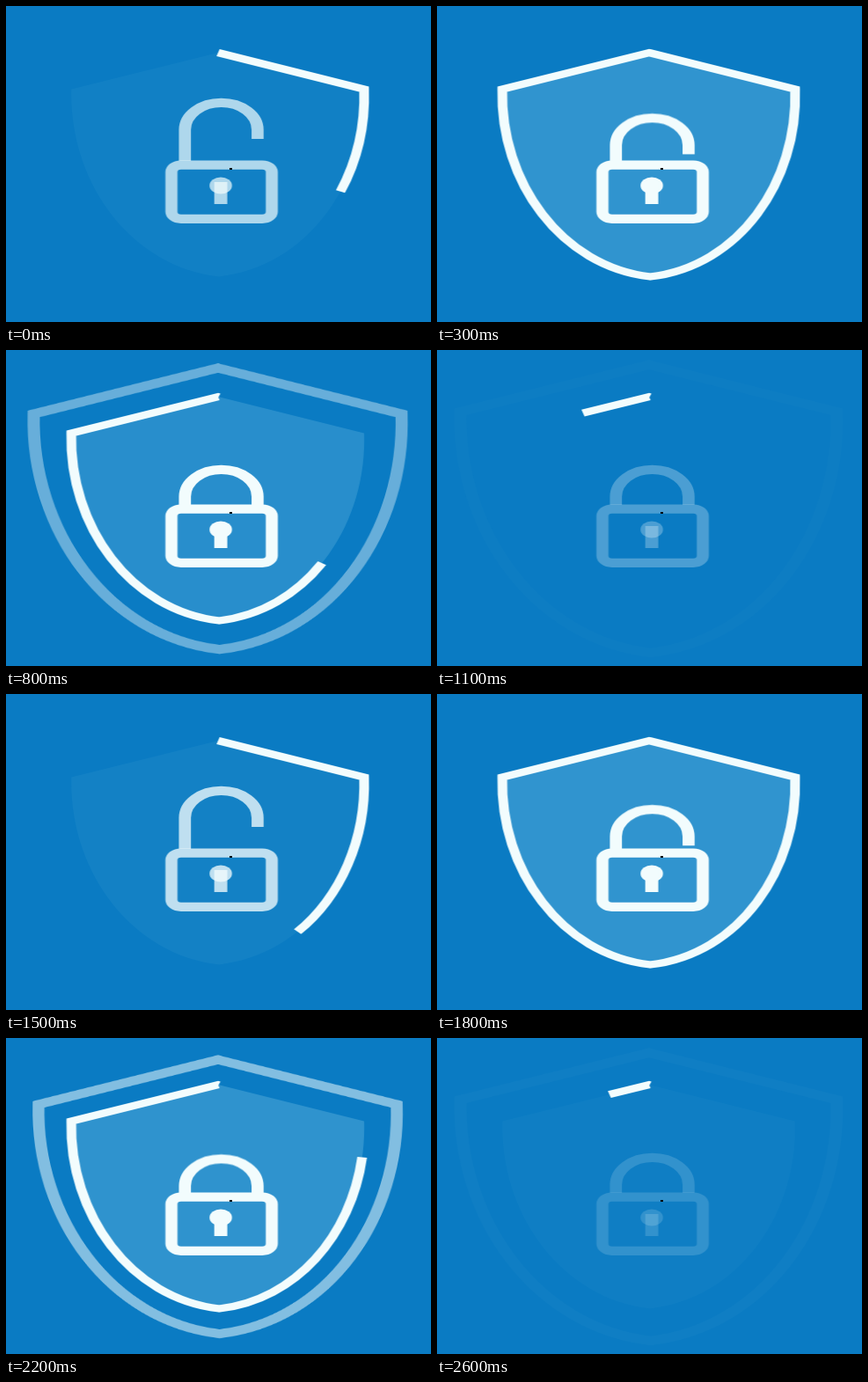
Write an HTML page without scripts that moves like this. It is 483 by 359 pixels and loops after 2700 ms.

```html
<!DOCTYPE html>
<html lang="en">
<head>
<meta charset="utf-8">
<title>Shield lock</title>
<style>
  html, body { margin: 0; width: 100%; height: 100%; overflow: hidden; background: #0a7bc3; }
  svg { display: block; width: 100vw; height: 100vh; }

  .line { fill: none; stroke: #f2fcfd; }
  .solid { fill: #f2fcfd; }
  .outline, .ring { stroke-width: 8.2; }
  .lock { stroke-width: 10.2; }

  .outline, .tint, .ring, .lock, .shackle {
    animation: 2.7s linear infinite;
  }
  .outline { stroke-dasharray: 1000 1000; animation-name: trace; }
  .tint { fill: #c8f8ff; animation-name: tint; }
  .ring { animation-name: grow, dissolve; }
  .lock { animation-name: appear; }
  .shackle { animation-name: close; }

  /* The stroke draws clockwise, then erases clockwise, twice per loop. */
  @keyframes trace {
    0% { stroke-dashoffset: 690; animation-timing-function: cubic-bezier(.3, .43, .6, 1); }
    11.44% { stroke-dashoffset: 0; }
    17.9% { stroke-dashoffset: 0; animation-timing-function: ease-in-out; }
    46.2% { stroke-dashoffset: -1000; animation-timing-function: step-end; }
    47.4% { stroke-dashoffset: 1000; animation-timing-function: ease-in-out; }
    65.93% { stroke-dashoffset: 0; }
    72.3% { stroke-dashoffset: 0; animation-timing-function: cubic-bezier(.42, 0, .64, 1); }
    100% { stroke-dashoffset: -1000; }
  }
  @keyframes tint {
    0% { opacity: .04; }
    9.2%, 26.7% { opacity: .2; }
    40.7%, 53% { opacity: 0; }
    63.7%, 81.5% { opacity: .2; }
    95.5%, 100% { opacity: .03; }
  }
  @keyframes grow {
    0% { transform: scale(1); }
    12.41% { transform: scale(1); animation-timing-function: ease; }
    40.19% { transform: scale(1.285); animation-timing-function: step-end; }
    48% { transform: scale(1); }
    68.15% { transform: scale(1); animation-timing-function: ease; }
    95.93%, 100% { transform: scale(1.285); }
  }
  @keyframes dissolve {
    0% { opacity: 0; animation-timing-function: step-end; }
    12.41% { opacity: 1; }
    41.3% { opacity: 0; animation-timing-function: step-end; }
    68.15% { opacity: 1; }
    95.5%, 100% { opacity: .025; }
  }
  @keyframes appear {
    0% { opacity: .7; }
    3%, 35.19% { opacity: 1; }
    42.96%, 48.15% { opacity: 0; }
    57.78%, 89.63% { opacity: 1; }
    97.6%, 100% { opacity: 0; }
  }
  /* The shackle presses slightly past its seat, then settles. */
  @keyframes close {
    0% { transform: translateY(-26px); }
    4.07% { transform: translateY(-26px); animation-timing-function: ease-in-out; }
    16.3%, 27% { transform: translateY(1.5px); }
    29.6% { transform: none; animation-timing-function: step-end; }
    45% { transform: translateY(-26px); }
    58.52% { transform: translateY(-26px); animation-timing-function: ease-in-out; }
    70.74%, 81.5% { transform: translateY(1.5px); }
    84.1%, 100% { transform: none; }
  }
</style>
</head>
<body>
<svg viewBox="0 0 483 359" preserveAspectRatio="none">
  <defs>
    <!-- The short overrun past the apex mitres the seam. -->
    <path id="shield" pathLength="1000" d="M0-127 123.4-85.5C126 20 76 116 1 127.5C-74 116-126 20-124-85.5L0-127 .5-126.8"/>
    <clipPath id="aboveBody"><rect x="-60" y="-90" width="130" height="85.5"/></clipPath>
  </defs>
  <g transform="translate(241 180) scale(1.345 1)">
    <use href="#shield" class="tint"/>
    <use href="#shield" class="line ring"/>
    <use href="#shield" class="line outline"/>
    <g class="lock" clip-path="url(#aboveBody)">
      <path class="line shackle" d="M-28 40V-13.5a30.7 30.7 0 0 1 61.4 0V-3"/>
    </g>
    <rect class="line lock" x="-39.4" y=".6" width="84.8" height="61.2" rx="8"/>
    <circle class="solid lock" cx="2.3" cy="24" r="9.5"/>
    <rect class="solid lock" x="-3.2" y="20" width="11" height="25"/>
  </g>
  <rect x="254" y="184" width="3" height="2"/>
</svg>
</body>
</html>
```
